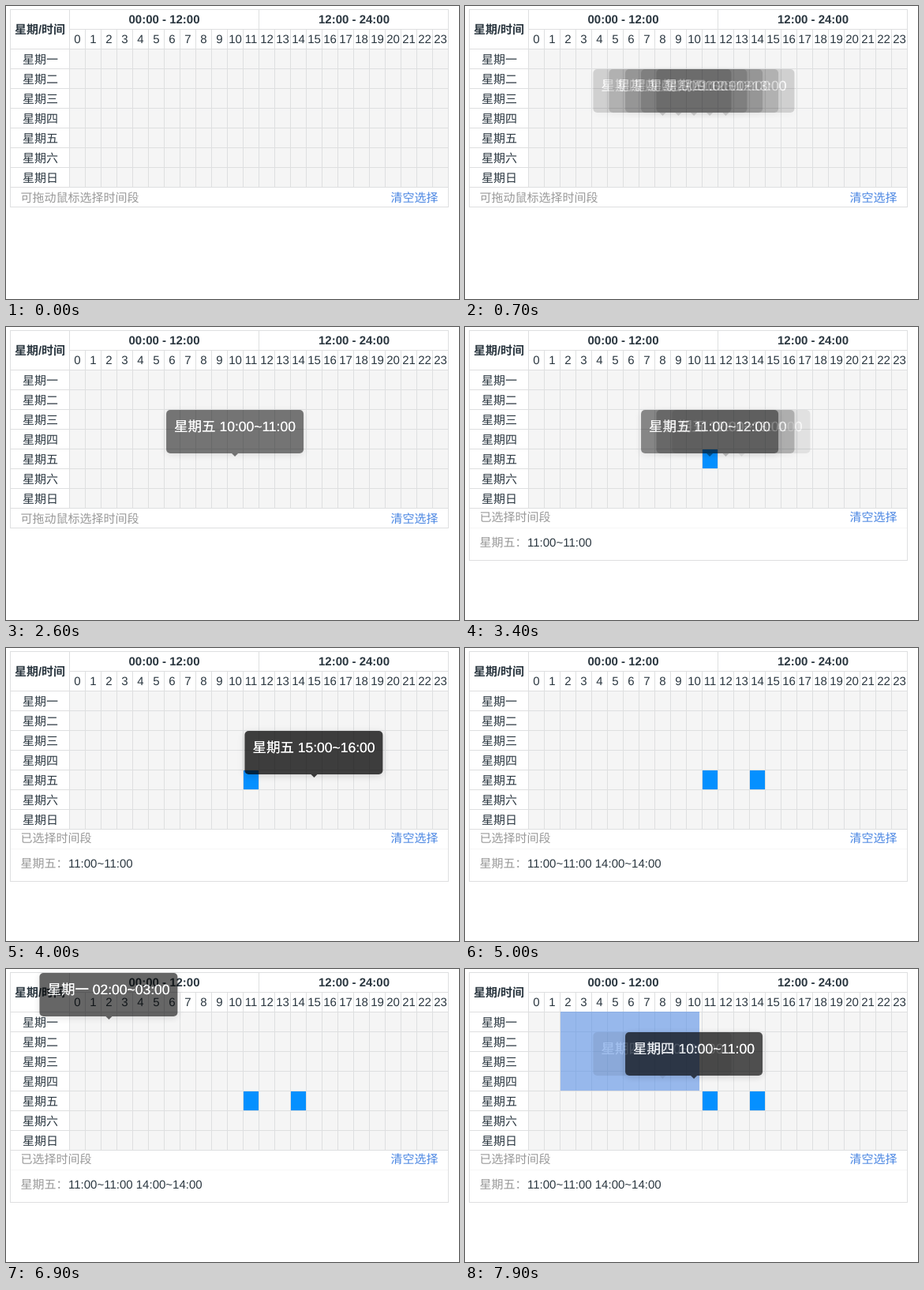
An HTML page for the animation above (8000 ms loop, 574 by 371 pixels).

```html
<!DOCTYPE html>
<html lang="zh-CN">
<head>
<meta charset="utf-8">
<title>时间段选择</title>
<style>
  html, body { margin: 0; width: 100%; height: 100%; overflow: hidden; background: #fff; }
  body {
    position: relative; text-rendering: geometricPrecision;
    font: 15px "Liberation Sans", "Noto Sans CJK SC", "Noto Sans CJK", sans-serif;
  }
  svg { position: absolute; left: 0; top: 0; fill: #2b3740; }
  .line { stroke: #dedfe0; fill: none; shape-rendering: crispEdges; }
  .on { fill: #0590ff; }
  .drag { fill: #598fe6; opacity: .6; }
  .mid { text-anchor: middle; }
  .bold { font-weight: bold; }
  .grey { fill: #999; }
  .link { fill: #4a86e2; }
  .tip {
    position: absolute; height: 55px; padding: 0 10px; border-radius: 5px;
    background: rgba(0, 0, 0, .75); box-shadow: 0 2px 10px rgba(0, 0, 0, .15);
    color: #fff; font-size: 17.5px; line-height: 42px; white-space: nowrap;
    text-shadow: 0 0 .5px #fff; transform: translateX(-50%);
  }
  .tip::after {
    content: ""; position: absolute; left: 50%; top: 55px; margin-left: -4px;
    border: 4px solid transparent; border-top-color: rgba(0, 0, 0, .75); border-bottom: 0;
  }
</style>
</head>
<body>
<svg id="table" width="574" height="371"></svg>
<div id="tips"></div>
<script>
const LOOP = 8000, STEP = 100;
const DAYS = [...'一二三四五六日'].map(d => '星期' + d);

// Pointer strokes over the table as [time, column, row]; between strokes it is outside
const STROKES = [
  [[290, 17, 2], [310, 17, 2]],
  [[520, 12, 3], [700, 8, 3], [1100, 8, 3]],
  [[1490, 4, 3], [2050, 4, 3], [2390, 9, 4]],
  [[2480, 10, 4], [2600, 10, 4], [2700, 11, 4], [3300, 11, 4], [3650, 17, 4], [3800, 15, 4],
   [4020, 15, 4], [4100, 14, 4], [4400, 14, 4], [4600, 1, 1], [4800, 1, 1]],
  [[5450, 6, 2], [5600, 6, 2], [5900, 9, 3], [6200, 9, 3]],
  [[6620, 4, 1], [6700, 3, 0]],
  [[6750, 2, 0], [7100, 2, 0], [7500, 8, 2], [7720, 8, 3], [7740, 10, 3], [LOOP, 10, 3]]
];
// Button held from, until
const PRESSES = [[3000, 3100], [4200, 4300], [7100, LOOP]];

const colX = c => 80 + 20 * c;
const rowY = r => 54 + 25 * r;
const hour = h => String(h).padStart(2, '0') + ':00';
const mean = list => list.reduce((a, b) => a + b) / list.length;
const text = (x, y, s, cls = '') => `<text x="${x}" y="${y}" class="${cls}">${s}</text>`;
const rect = (x, y, w, h, cls) => `<rect x="${x}" y="${y}" width="${w}" height="${h}" class="${cls}"/>`;
const hLine = (x, y, end) => `M${x} ${y + .5}H${end}`;
const vLine = (x, y, end) => `M${x + .5} ${y}V${end}`;

// Cell [column, row] under the pointer, or null
function hovered(t) {
  const path = STROKES.find(s => t >= s[0][0] && t <= s[s.length - 1][0]);
  if (!path) return null;
  const i = path.findIndex(p => p[0] >= t) || 1;
  const a = path[i - 1], b = path[i], k = (t - a[0]) / (b[0] - a[0]);
  return [1, 2].map(n => Math.round(a[n] + (b[n] - a[n]) * k));
}

// Times of the last 200 ms; averaging over them gives fades and soft motion
const trail = t => Array.from({ length: 10 }, (_, i) => t - 20 * i);

function grid() {
  let path = hLine(5, 4, 561) + hLine(80, 29, 561) + vLine(320, 4, 29);
  for (let r = 0; r < 8; r++) path += hLine(5, rowY(r), 561);
  for (let c = 0; c <= 24; c++) path += vLine(colX(c), c % 24 ? 29 : 4, 229);
  let out = `<rect x="81" y="55" width="479" height="174" fill="#f5f5f5"/><path class="line" d="${path}"/>`;
  out += text(43, 35, '星期/时间', 'mid bold')
    + text(200.5, 22, '00:00 - 12:00', 'mid bold')
    + text(441, 22, '12:00 - 24:00', 'mid bold');
  for (let c = 0; c < 24; c++) out += text(colX(c) + 10.5, 47, c, 'mid');
  DAYS.forEach((d, r) => out += text(43.5, rowY(r) + 18.5, d, 'mid'));
  return out;
}

function footer(cells) {
  const chosen = cells.length > 0, bottom = chosen ? 295 : 254, y = chosen ? 246 : 248;
  let out = `<path class="line" d="${vLine(5, 4, bottom) + vLine(560, 4, bottom) + hLine(5, bottom, 561)}"/>`
    + text(18.5, y, chosen ? '已选择时间段' : '可拖动鼠标选择时间段', 'grey')
    + text(487.5, y, '清空选择', 'link');
  if (chosen) {
    const list = cells.map(([c]) => `${hour(c)}~${hour(c)}`).join(' ');
    out += '<path d="M6 254.5H560" stroke="#f6f6f6"/>'
      + text(18.5, 278, DAYS[cells[0][1]] + '\uFF1A', 'grey') + text(79, 278, list);
  }
  return out;
}

function dragBox(t) {
  const press = PRESSES.find(([from, to]) => t >= from && t < to);
  if (!press) return '';
  const [c, r] = hovered(press[0]);
  const cells = trail(t).map(s => hovered(Math.max(s, press[0])));
  const w = 20 * (mean(cells.map(p => p[0])) - c + 1);
  const h = 25 * (mean(cells.map(p => p[1])) - r + 1);
  return rect(colX(c) + 1, rowY(r), w, h, 'drag');
}

function tooltips(t) {
  const alpha = {};
  for (const cell of trail(t).map(hovered)) {
    if (cell) alpha[cell] = (alpha[cell] || 0) + .1;
  }
  return Object.entries(alpha).map(([key, a]) => {
    const [c, r] = key.split(',').map(Number);
    return `<div class="tip" style="left:${colX(c) + 10}px;top:${5 + 25 * r}px;opacity:${a}">`
      + `${DAYS[r]} ${hour(c)}~${hour(c + 1)}</div>`;
  }).join('');
}

const table = document.getElementById('table'), tips = document.getElementById('tips');
const base = grid();
let last = -1;

function draw() {
  const t = Math.floor(performance.now() % LOOP / STEP) * STEP;
  if (t !== last) {
    last = t;
    const cells = PRESSES.filter(p => t >= p[1]).map(p => hovered(p[0]));
    const marks = cells.map(([c, r]) => rect(colX(c) + 1, rowY(r) + 1, 19, 24, 'on')).join('');
    table.innerHTML = base + footer(cells) + marks + dragBox(t);
    tips.innerHTML = tooltips(t);
  }
  requestAnimationFrame(draw);
}
draw();
</script>
</body>
</html>
```
